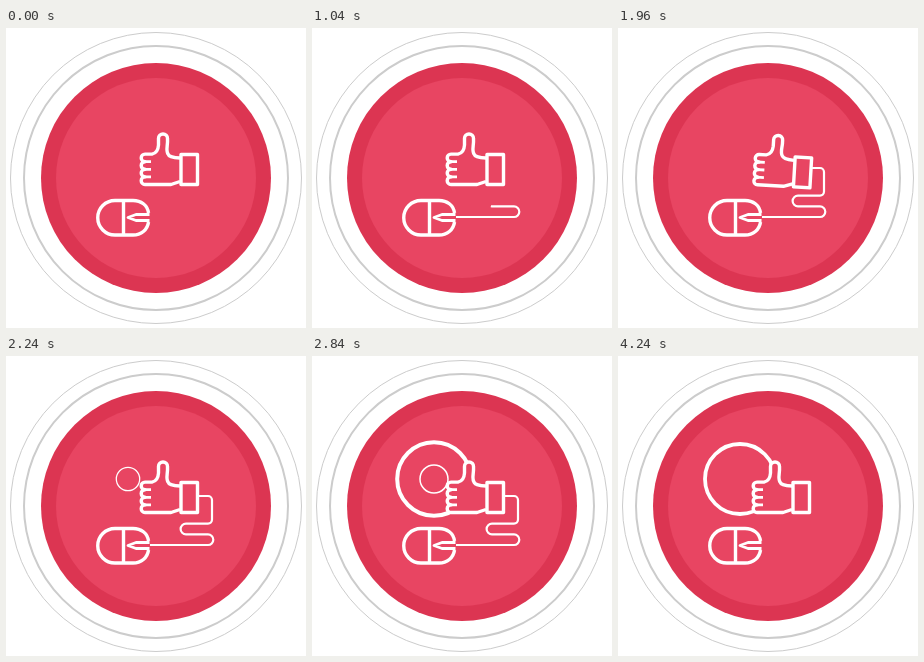
Recreate the animation shown at these times as an HTML page. Size 300 by 300 pixels, loop 4280 ms.

```html
<!DOCTYPE html>
<html lang="en">
<head>
<meta charset="utf-8">
<title>Click and pay</title>
<style>
  html, body { margin: 0; width: 100%; height: 100%; overflow: hidden; background: #fff; }
  svg { display: block; width: 100vw; height: 100vh; }
  .icon { fill: none; stroke: #fff; stroke-width: 3.4; stroke-linejoin: round; }
  .solid { fill: #e84562; }
</style>
</head>
<body>
<svg viewBox="0 0 300 300">
  <g fill="none" stroke="#ccc">
    <circle cx="150" cy="150" r="145.5"/>
    <circle cx="150" cy="150" r="132" stroke-width="2"/>
  </g>
  <circle cx="150" cy="150" r="115" fill="#dc3552"/>
  <circle cx="150" cy="150" r="100" fill="#e84562"/>
  <g class="icon">
    <circle id="coin" cx="122" cy="123" r="35" stroke-width="3.8"/>
    <circle id="rim" cx="122" cy="123" r="28" stroke-width="3"/>
    <path id="dollar" stroke-width="3" d="M129.5 117.500C129.500 110 116.500 110 116.500 117C116.500 123.500 129.500 121.500 129.500 128.500C129.500 135.500 116.500 135.500 116.500 128M123 107v5M123 133.500v5"/>
    <path id="cord" pathLength="1" stroke-width="2.2" d="M144 189H202a5.300 5.300 0 0 0 0-10.600H180a5.400 5.400 0 0 1 0-10.800H202a4 4 0 0 0 4-4V144a4 4 0 0 0-4-4H192"/>
    <g id="mouse">
      <path d="M142.500 185C141.500 177 135 172.500 127 172.500H109a17 17 0 0 0 0 34.500H127C135 207 141.500 202 142.500 194M117.500 172.500V207"/>
      <path stroke-width="2.800" d="M143.500 186.500H130L122 189.500L130 192.500H143.500"/>
    </g>
    <g id="hand">
      <path class="solid" d="M174 153.500L165 156.500H139a3.800 3.800 0 0 1 0-7.600a3.800 3.800 0 0 1 0-7.600a3.800 3.800 0 0 1 0-7.600a3.800 3.800 0 0 1 0-7.600H146Q152 125 152.500 117V110.500a4.500 4.500 0 0 1 9 0C162 118 159.500 122 162 126Q163 129.500 174 130"/>
      <path stroke-width="2.800" d="M138 148.900h7M138 141.300h7M138 133.700h7"/>
      <path class="solid" d="M175 126.500H191.500V156.500H175Z"/>
    </g>
  </g>
</svg>
<script>
const LOOP = 4280, STEP = 40;
const el = id => document.getElementById(id);
const [coin, rim, dollar, cord, mouse, hand] =
  ["coin", "rim", "dollar", "cord", "mouse", "hand"].map(el);

const ramp = (t, a, b) => Math.min(1, Math.max(0, (t - a) / (b - a)));
const ease = (t, a, b) => { const p = ramp(t, a, b); return p * p * (3 - 2 * p); };
const bump = (t, a, b) => Math.sin(Math.PI * ramp(t, a, b)) ** 2;

function scale(node, s, x, y) {
  node.setAttribute("visibility", s > 0.001 ? "visible" : "hidden");
  node.setAttribute("transform", `translate(${x} ${y}) scale(${s}) translate(${-x} ${-y})`);
}

function draw(t) {
  scale(mouse, 1 + 0.07 * bump(t, 0, 420), 117.5, 189.5);
  hand.setAttribute("transform", `rotate(${9 * bump(t, 1580, 2060)} 134 165)`);

  // The cord grows from the mouse, then is eaten away from the same end.
  const head = ramp(t, 400, 1560), tail = ramp(t, 3000, 4160);
  cord.setAttribute("visibility", head > tail ? "visible" : "hidden");
  cord.setAttribute("stroke-dasharray", `0 ${tail} ${head - tail} 2`);

  const grow = 0.82 * ramp(t, 2020, 2560) + 0.25 * Math.sin(Math.PI / 2 * ramp(t, 2560, 2780));
  scale(coin, grow - 0.07 * ease(t, 2780, 2960), 122, 123);
  scale(rim, ease(t, 2680, 3000) - ease(t, 3920, 4220), 122, 123);
  scale(dollar, ease(t, 2860, 3200) - ease(t, 3440, 3880), 123, 123);
}

function frame() {
  const t = performance.now() % LOOP;
  draw(Math.floor(t / STEP) * STEP);
  requestAnimationFrame(frame);
}
frame();
</script>
</body>
</html>
```
